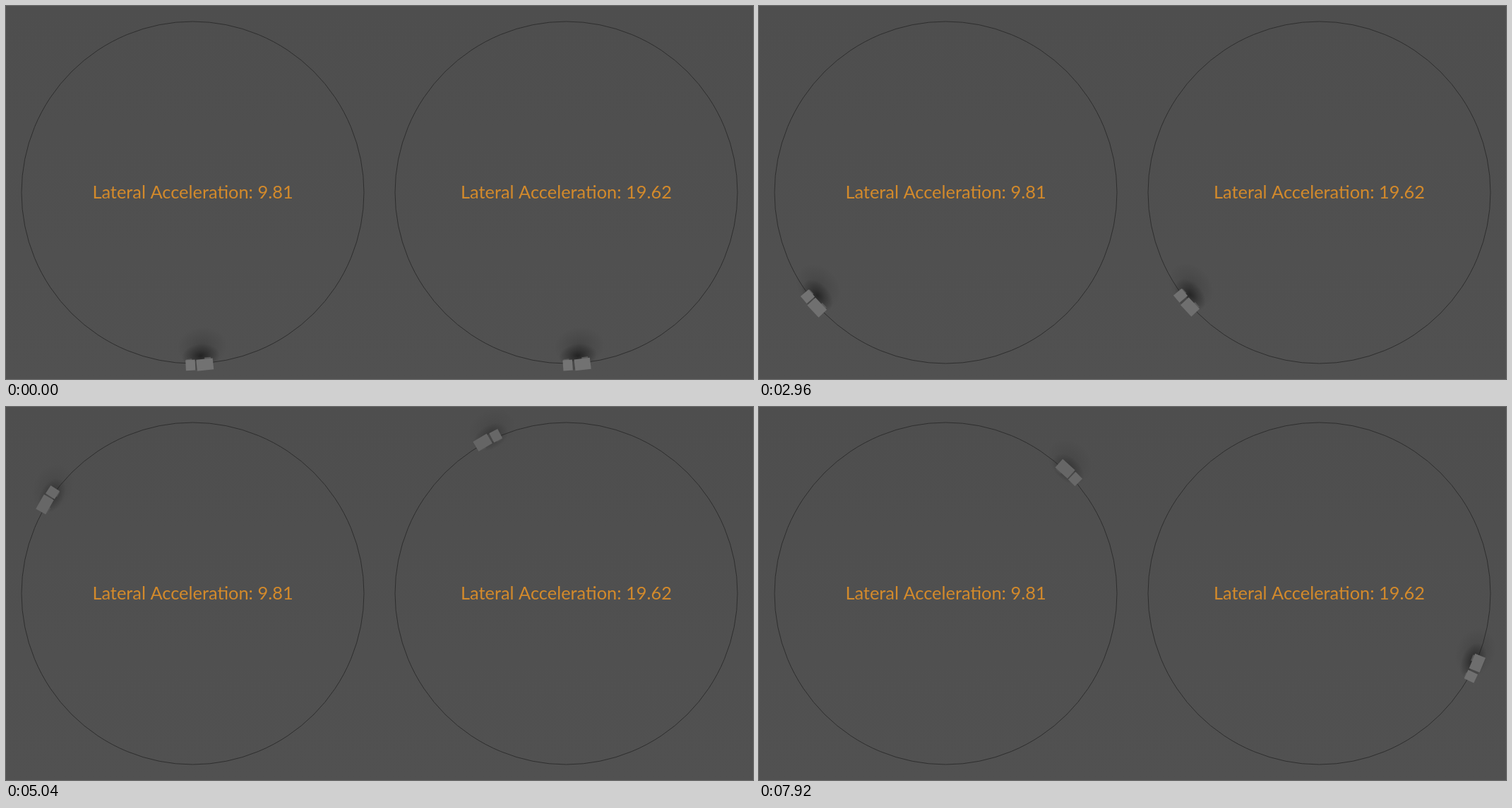
Write an HTML page with a canvas that moves like this. It is 1058 px wide and 529 px high and loops after 8 s.

```html
<!DOCTYPE html>
<html>
<head>
<meta charset="utf-8">
<style>
  html, body { margin: 0; width: 100%; height: 100%; overflow: hidden; background: #4f4f4f; }
  canvas { display: block; }
</style>
</head>
<body>
<canvas id="stage" width="1058" height="529"></canvas>
<script>
const ctx = document.getElementById('stage').getContext('2d');
const RING = 242.5, TRACK = 245, CY = 264.5;

// Angle travelled clockwise from the bottom of the ring, at each time in seconds
const times = [0.4, 1.28, 2.08, 3.04, 3.76, 5.04, 6, 6.72, 7.92];
const scenes = [
  { cx: 264.5, label: '9.81', gap: 1,
    angles: [-0.039, 0.077, 0.37, 0.92, 1.361, 2.145, 2.737, 3.187, 3.936] },
  { cx: 793.5, label: '19.62', gap: 2,
    angles: [-0.061, 0.055, 0.347, 0.935, 1.538, 2.67, 3.515, 4.138, 5.161] }
];

function slope(p, i) {
  if (i === 0) return 0;
  const j = Math.min(i + 1, p.length - 1);
  return (p[j] - p[i - 1]) / (times[j] - times[i - 1]);
}

// Cubic Hermite interpolation, starting from rest
function angleAt(p, t) {
  let i = 0;
  while (i < times.length - 2 && t > times[i + 1]) i++;
  const d = times[i + 1] - times[i];
  const u = (t - times[i]) / d, v = 1 - u;
  return v * v * ((1 + 2 * u) * p[i] + u * d * slope(p, i)) +
         u * u * ((3 - 2 * u) * p[i + 1] - v * d * slope(p, i + 1));
}

const gray = (v, a = 1) => `rgba(${v},${v},${v},${a})`;

function box(x, y, w, h, v) {
  ctx.fillStyle = gray(v);
  ctx.fillRect(x, y, w, h);
}

function shadow(x, y, turn, rx, ry, alpha) {
  ctx.save();
  ctx.translate(x, y);
  ctx.rotate(turn);
  ctx.scale(rx, ry);
  const g = ctx.createRadialGradient(0, 0, 0, 0, 0, 1);
  g.addColorStop(0, gray(22, alpha));
  g.addColorStop(0.5, gray(22, alpha * 0.45));
  g.addColorStop(1, gray(22, 0));
  ctx.fillStyle = g;
  ctx.fillRect(-1, -1, 2, 2);
  ctx.restore();
}

function truck(cx, phi, gap) {
  const sx = -Math.sin(phi), sy = Math.cos(phi);
  const x = cx + TRACK * sx, y = CY + TRACK * sy;
  const turn = phi - 0.06;
  const strength = 0.6 + 0.4 * sy;
  shadow(x - 4 * sx + 4, y - 6 * sy - 20, turn, 36, 28, 0.1 + 0.14 * strength);
  shadow(x - 5 * sx + 2, y - 5 * sy - 8, turn, 27, 17, 0.35 + 0.4 * strength);

  const light = 107 + 7 * sy;
  ctx.save();
  ctx.translate(x, y);
  ctx.rotate(turn);
  box(-18, -10, 8, 4, light - 22);
  box(8, -10, 9, 4, light - 22);
  box(-9, -6, 8, 12, 72);
  box(-5 + gap, -8, 24.5 - gap, 16, light);
  ctx.rotate(0.05);
  box(-19.5, -8, 13.5, 15, light + 2);
  ctx.restore();
}

function draw(now) {
  const ms = Math.floor(now % 8000 / 80) * 80;
  const t = ms < 480 ? 0.4 : ms / 1000;
  const back = ctx.createLinearGradient(0, 0, 0, 529);
  back.addColorStop(0, '#4e4e4e');
  back.addColorStop(1, '#515151');
  ctx.fillStyle = back;
  ctx.fillRect(0, 0, 1058, 529);

  ctx.font = '25.4px Lato, sans-serif';
  ctx.textAlign = 'center';
  for (const s of scenes) {
    ctx.strokeStyle = '#2e2e2e';
    ctx.lineWidth = 1;
    ctx.beginPath();
    ctx.arc(s.cx, CY, RING, 0, 2 * Math.PI);
    ctx.stroke();
    truck(s.cx, angleAt(s.angles, t), s.gap);
    ctx.fillStyle = '#d38a2b';
    ctx.fillText('Lateral Acceleration: ' + s.label, s.cx, 273);
  }
}

const start = performance.now();
function loop() {
  draw(performance.now() - start);
  requestAnimationFrame(loop);
}
loop();
</script>
</body>
</html>
```
